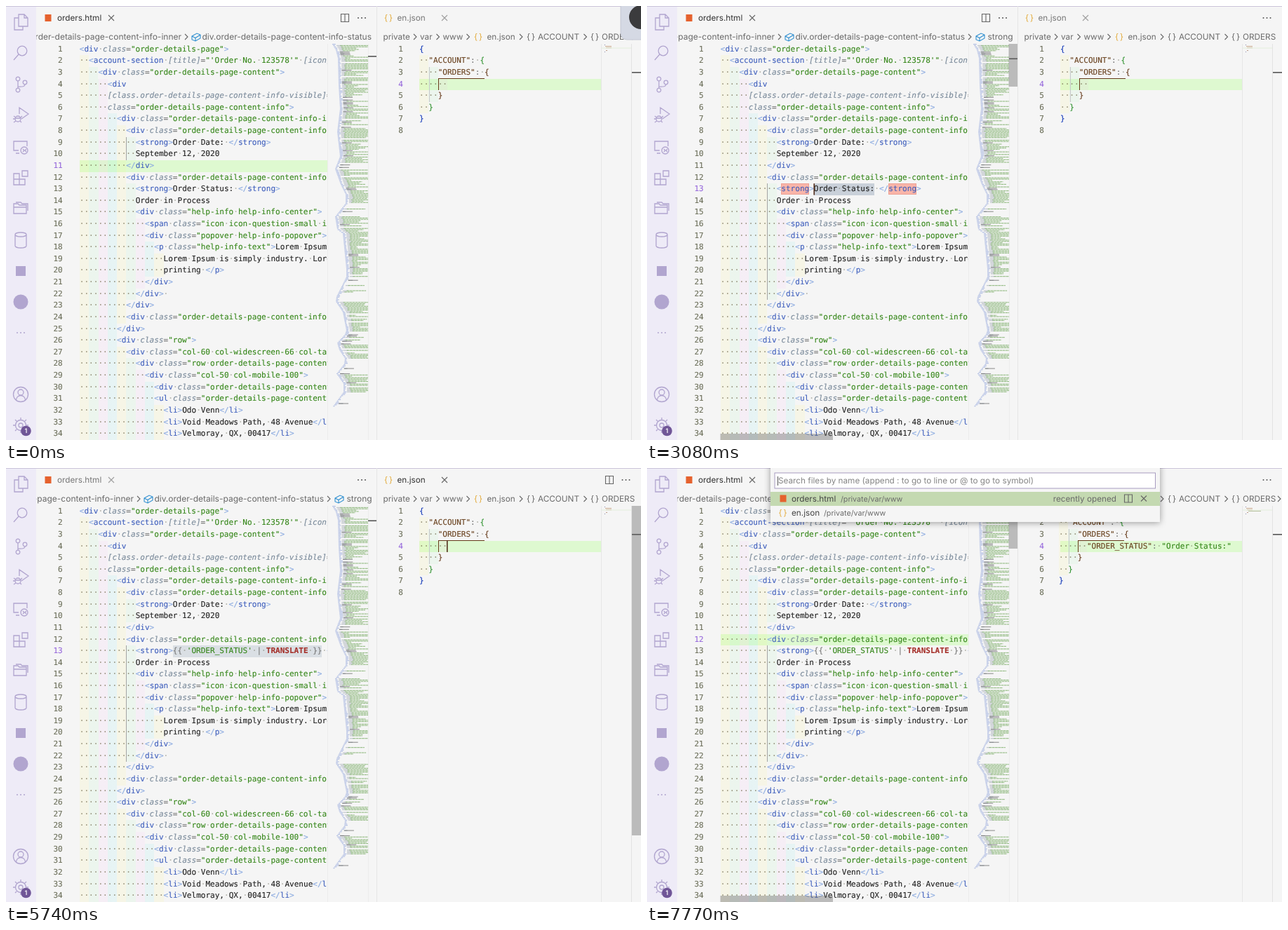
Animation of 905x619 px, one loop 8000 ms. Source, as an HTML page with a canvas:

```html
<!DOCTYPE html>
<html lang="en">
<head>
<meta charset="utf-8">
<title>Editor</title>
<style>
html, body { margin: 0; width: 100%; height: 100%; overflow: hidden; background: #f5f5f5; }
body { position: relative; text-rendering: geometricPrecision; }
#stage { position: absolute; left: 0; top: 0; width: 905px; height: 619px; overflow: hidden; }
#stage div, svg, canvas { position: absolute; }
.pane { top: 0; height: 619px; overflow: hidden; font: 11.04px/16.62px "DejaVu Sans Mono", monospace; color: #222; }
#html { left: 0; width: 458px; }
#json { left: 529px; width: 319px; }
.row { white-space: pre; height: 16.62px; -webkit-text-stroke: .12px; }
.num { width: 80.7px; text-align: right; color: #6d705b; }
#json .num { width: 36.8px; }
.num.on { color: #9769dc; }
.row b { font-weight: normal; }
.row i { font-style: normal; color: rgba(100, 100, 80, .45); }
.row .lead i { color: rgba(100, 90, 60, .62); }
.lead { background: repeating-linear-gradient(90deg,
  rgba(255, 245, 100, .1) 0 13.29px, rgba(127, 245, 150, .08) 13.29px 26.58px,
  rgba(255, 127, 255, .06) 26.58px 39.87px, rgba(79, 230, 236, .085) 39.87px 53.16px);
  display: inline-block; height: 16.62px; vertical-align: top; }
.row .p { color: #8aaae0; } .row .n { color: #3f5fbd; } .row .s { color: #36871a; }
.row .a { color: #7a8a9a; font-style: italic; } .row .e { color: #777; }
.row .f { color: #a5302a; font-weight: bold; } .row .k { color: #6a4320; }
.row .b1 { color: #1238b8; } .row .b2 { color: #319331; } .row .b3 { color: #663a1a; }
.hl { background: #def9d0; height: 16.62px; }
.sel { background: #c9d0d9; height: 16.62px; }
.hit { background: #f9b5a9; box-shadow: inset 0 0 0 1px #eda093; height: 16px; }
.guide { background: #a4a4a4; width: 1px; }
.match { width: 6px; height: 14px; border: 1px solid #b4b4b4; background: rgba(0, 100, 0, .06); }
svg { left: 0; top: 0; font: 11.75px Inter, sans-serif; }
svg text { fill: #6a6a6a; white-space: pre; }
#crumb { font-size: 12px; }
.line { fill: none; stroke: #666; stroke-width: 1.1; }
.act { fill: none; stroke: #b1a5cf; stroke-width: 1.3; }
.thumb { fill: #646464; fill-opacity: .4; }
.tiny { font-size: 10.7px; }
</style>
</head>
<body>
<div id="stage">
  <div class="pane" id="html"></div>
  <div class="pane" id="json"></div>
  <canvas id="map" width="52" height="522" style="left:464px;top:54px"></canvas>
  <svg id="ui" width="905" height="619" viewBox="0 0 905 619"></svg>
</div>
<script>
const CH = 6.646, ROW = 16.62, LOOP = 8000;
const $ = id => document.getElementById(id);
const rowTop = n => 53.7 + (n - 1) * ROW;
const col = n => 104.8 + n * CH;

// ---- code ----
const esc = s => s.replace(/[<>& ]/g, c => ({ '<': '&lt;', '>': '&gt;', '&': '&amp;', ' ': '<i>·</i>' })[c]);
const tok = (c, s) => `<b class="${c}">${esc(s)}</b>`;
const lead = n => `<span class="lead">${esc(' '.repeat(n))}</span>`;

const inTag = s => s.replace(/(<\/?)([\w-]+)|(\/?>)|("[^"]*"?)|([^\s="<>]+)|(\s+)|=/g,
  (m, open, name, close, str, attr, gap) =>
    open ? tok('p', open) + tok('n', name) : close ? tok('p', close) :
    str ? tok('s', str) : attr ? tok('a', attr) : gap ? esc(gap) : tok('e', m));

const paint = s => s[0] === '~' ? inTag(s.slice(1)) :
  s.match(/<[^>]*>?|[^<]+/g).map(p => p[0] === '<' ? inTag(p) : esc(p)).join('');

const info = 'order-details-page-content';
const source = `0<div class="order-details-page">
1<account-section [title]="'Order No. 123578'" [icon]="'orders'">
2<div class="${info}">
3<div
3~[class.${info}-info-visible]="visible"
3~class="${info}-info">
4<div class="${info}-info-inner">
5<div class="${info}-info-date">
6<strong>Order Date: </strong>
6September 12, 2020
5</div>
5<div class="${info}-info-status">
6<strong>Order Status: </strong>
6Order in Process
6<div class="help-info help-info-center">
7<span class="icon icon-question-small icon-help"></span>
7<div class="popover help-info-popover">
8<p class="help-info-text">Lorem Ipsum is simply
9Lorem Ipsum is simply industry. Lorem Ipsum
9printing </p>
7</div>
6</div> 
5</div>
5<div class="${info}-info-total">
4</div>
4<div class="row">
5<div class="col-60 col-widescreen-66 col-tablet-100">
6<div class="row ${info}-row">
7<div class="col-50 col-mobile-100">
8<div class="${info}-title">
8<ul class="${info}-list">
9<li>Odo Venn</li>
9<li>Void Meadows Path, 48 Avenue</li>
9<li>Velmoray, QX, 00417</li>`.split('\n');

function add(parent, cls, x, y, w, h) {
  const d = document.createElement('div');
  d.className = cls;
  d.style.cssText = `left:${x}px;top:${y}px` + (w ? `;width:${w}px` : '') + (h ? `;height:${h}px` : '');
  return parent.appendChild(d);
}
const show = (el, on) => { el.style.display = on ? '' : 'none'; };

const left = $('html'), right = $('json');
const leftHl = add(left, 'hl', 104.8, 0, 354);
const sel = add(left, 'sel', 0, rowTop(13));
const hits = [13, 36].map(c => add(left, 'hit', col(c), rowTop(13), 6 * CH));
const leftNums = [], leftRows = [];
source.forEach((s, i) => {
  const y = rowTop(i + 1);
  const num = add(left, 'row num', 0, y);
  num.textContent = i + 1;
  leftNums.push(num);
  const row = add(left, 'row', 104.8, y);
  row.innerHTML = lead(s[0] * 2) + paint(s.slice(1));
  leftRows.push(row);
});
const status = [leftRows[12].innerHTML,
  lead(12) + paint('<strong>') + tok('e', '{{ ') + tok('s', "'ORDER_STATUS'") + tok('e', ' | ') +
  tok('f', 'TRANSLATE') + tok('e', ' }}') + esc(' ') + paint('</strong>')];
const guide = add(left, 'guide', 0, 0);

add(right, 'hl', 60, rowTop(4), 260);
const json = add(right, '', 60, 0, 400, 619);
const entry = [lead(6), lead(6) + tok('k', '"ORDER_STATUS"') + tok('e', ':') + esc(' ') + tok('s', '"Order Status:"')];
const jsonRows = [tok('b1', '{'),
  lead(2) + tok('k', '"ACCOUNT"') + tok('e', ':') + esc(' ') + tok('b2', '{'),
  lead(4) + tok('k', '"ORDERS"') + tok('e', ':') + esc(' ') + tok('b3', '{'),
  entry[0], lead(4) + tok('b3', '}'), lead(2) + tok('b2', '}'), tok('b1', '}'), ''
].map((h, i) => {
  const num = add(right, 'row num' + (i === 3 ? ' on' : ''), 0, rowTop(i + 1));
  num.textContent = i + 1;
  const row = add(json, 'row', 0, rowTop(i + 1));
  row.innerHTML = h;
  return row;
});
add(json, 'guide', 14, rowTop(3), 0, 3 * ROW).style.background = '#c8c8c8';
add(json, 'guide', 27.3, rowTop(4), 0, ROW).style.background = '#663a1a';
add(json, 'guide', 27.3, rowTop(4) - .7, 66, 1).style.background = '#663a1a';
const matches = [[14, 3], [4, 5]].map(([c, r]) => add(json, 'match', c * CH - .7, rowTop(r)));

// ---- minimap ----
(function () {
  const g = $('map').getContext('2d');
  const edge = [[0, 1], [8, 6], [20, 9], [58, 10], [92, 12], [125, 8], [160, 12], [178, 5], [200, 13],
    [214, 20], [227, 20], [246, 5], [264, 8], [270, 16], [320, 21], [332, 21], [360, 7], [367, 6],
    [382, 16], [408, 21], [414, 19], [426, 8], [436, 11], [448, 19], [456, 18], [470, 7], [484, 17],
    [496, 17], [518, 1]];
  let seed = 7;
  const rnd = () => (seed = seed * 16807 % 2147483647) / 2147483647;
  const dash = (c, x, y, w) => { g.fillStyle = c; g.fillRect(x, y, w, 1.1); };
  for (let y = 0, k = 0; y < 518; y += 1.85) {
    while (edge[k + 1][0] < y) k++;
    const [y0, x0] = edge[k], [y1, x1] = edge[k + 1];
    const x = x0 + (x1 - x0) * (y - y0) / (y1 - y0), r = rnd();
    dash('rgba(90,120,205,.45)', x, y, 2 + rnd() * 3);
    if ((x1 < x0 && y > 170 && r < .75) || r < .08) continue;
    const w = 5 + rnd() * 3, end = r < .55 ? 52 : x + 16 + rnd() * 24;
    dash('rgba(110,125,140,.42)', x + 5, y, w - 1);
    if (r > .86) dash('rgba(50,50,50,.5)', x + 5, y, 14);
    else for (let q = x + w + 3; q < end; q += 4.2) dash('rgba(68,140,39,.55)', q, y, Math.min(3.7, end - q));
  }
})();

// ---- interface ----
const text = (x, y, s, extra = '') => `<text x="${x}" y="${y + 4.2}" ${extra}>${s}</text>`;
const path = (x, y, d, cls = 'line') => `<path class="${cls}" transform="translate(${x} ${y})" d="${d}"/>`;
const disc = (x, y, r, fill) => `<circle cx="${x}" cy="${y}" r="${r}" fill="${fill}"/>`;
const rect = (x, y, w, h, attr) => `<rect x="${x}" y="${y}" width="${w}" height="${h}" ${attr}/>`;
const group = (id, inner) => `<g id="${id}">${inner}</g>`;
const ring = (x, y, r) => `M${x - r} ${y}a${r} ${r} 0 1 0 ${2 * r} 0a${r} ${r} 0 1 0 ${-2 * r} 0`;
const chevron = x => path(x, 44, 'M-2 -4l4 4l-4 4');
const cross = (x, y) => path(x, y, 'M-4 -4l8 8M4 -4l-8 8');
const split = (x, y) => path(x, y, 'M-5.5 -5.5h11v11h-11zM0 -5.5v11');
const more = (x, y, fill = '#555') => [-5, 0, 5].map(d => disc(x + d, y, 1, fill)).join('');
const cube = x => path(x, 44, 'M-6 -1l7 -4l5 2v5l-7 4l-5 -2zM-6 -1l5 2.5l7 -4.5M-1 1.5v4.5').replace('class', 'style="stroke:#2f8fd0" class');
const braces = (x, y, c) => text(x, y, '{}', `text-anchor="middle" style="fill:${c};letter-spacing:2px"`);
const htmlMark = (x, y) => rect(x - 4.5, y - 5, 9, 10, 'fill="#e5622e"');
const badge = y => disc(28.5, y, 7.3, '#705697') + text(28.5, y - .8, '1', 'text-anchor="middle" style="fill:#fff;font-size:9px;font-weight:600"');

const actions = [
  [23, 'M-3 -11h8l5 5v12h-13zM5 -11v5h5M-3 -6h-6v17h12v-5'],
  [67, ring(2, -3, 6.8) + 'M-3 2l-7 8'],
  [112, ring(-4, -8, 2.8) + ring(-4, 8, 2.8) + ring(6, -3, 2.8) + 'M-4 -5v10M6 0q0 4 -10 3'],
  [156, 'M-2 -2v-9l13 9l-10 7' + ring(-4, 5, 4) + 'M-10 1l3 2M-11 5h3M-10 10l3 -2M2 1l-2 2M1 10l-2 -2M-8 4h8'],
  [201, 'M-3 5h-7v-13h19v7M-7 9h5' + ring(5, 5, 5) + 'M3 3l2 2l-2 2M8 3l-2 2l2 2'],
  [245, 'M-10 -6h8v8h8v8h-16zM-2 2v8M-10 2h8M2 -10h8v8h-8z'],
  [289, 'M-10 7v-14h6l2 2h10v12zM-10 -2h18M-7 -9h7l2 2h8v10'],
  [334, 'M-8 -8a8 3 0 0 1 16 0a8 3 0 0 1 -16 0v16a8 3 0 0 0 16 0v-16'],
  [554, ring(0, 0, 10.5) + ring(0, -3, 4) + 'M-6.5 8a6.5 6.5 0 0 1 13 0'],
  [598, ring(0, 0, 3) + ring(0, 0, 7.5) + 'M0 -11v3M0 8v3M-11 0h3M8 0h3M-8 -8l2.4 2.4M6 6l2 2M8 -8l-2.4 2.4M-6 6l-2 2']
];

$('ui').innerHTML =
  group('crumb', text(250, 44, 'div.order-details-page-content-info-inner', 'text-anchor="end"') +
    chevron(257) + cube(271) + text(521, 44, 'div.order-details-page-content-info-status', 'text-anchor="end"') +
    group('strong', chevron(528) + cube(543) + text(553.5, 44, 'strong'))) +
  rect(0, 0, 43, 619, 'fill="#eeebf7"') +
  rect(0, 0, 905, 1, 'fill="#cbc4da"') +
  rect(458, 54, 1, 565, 'fill="#ececec"') + rect(528, 0, 1, 619, 'fill="#e6e6e6"') +
  rect(516, 54, 1, 565, 'fill="#ececec"') +
  rect(848, 54, 1, 565, 'fill="#e6e6e6"') + rect(891, 54, 1, 565, 'fill="#e2e2e2"') +
  actions.map(([y, d]) => path(21, y, d, 'act')).join('') +
  rect(14, 371, 14, 14, 'fill="#b1a5cf"') + disc(21, 422, 10.5, '#b1a5cf') + more(21, 466, '#b1a5cf') +
  badge(606) + group('dirty', badge(30)) +
  htmlMark(60, 17) + text(73, 17, 'orders.html', 'id="tabL"') + group('closeL', cross(150, 17)) +
  disc(150, 17, 4, '#333" id="dotL') + more(507, 17) +
  braces(546, 17, '#e3ac3f') + text(557.5, 17, 'en.json', 'id="tabR"') + group('closeR', cross(625, 17)) +
  disc(625, 17, 4, '#333" id="dotR') + more(883.5, 17) +
  group('split', split(483, 17)) +
  text(537.5, 44, 'private') + chevron(583) + text(590, 44, 'var') + chevron(615.5) + text(622.5, 44, 'www') +
  chevron(658.5) + braces(674, 44, '#e3ac3f') + text(685.5, 44, 'en.json') + chevron(734) +
  braces(749, 44, '#666') + text(758, 44, 'ACCOUNT') + chevron(825.5) + braces(840, 44, '#666') +
  text(849, 44, 'ORDERS') + group('tail', chevron(901)) +
  rect(853, 55, 1, 1, 'fill="#88a"') + rect(854, 57, 9, 1, 'fill="#c9a98c"') + rect(855, 59, 8, 1, 'fill="#c9a98c"') +
  group('mapEntry', rect(857, 61, 18, 1, 'fill="#b5bf9c"')) + rect(855, 63, 2, 1, 'fill="#b98"') + rect(853, 65, 1, 1, 'fill="#88a"') +
  rect(849, 59.5, 42, 1, 'fill="#e4efdc"') +
  rect(516, 0, 12, 1.6, 'fill="#555" id="mark"') + rect(892, 94, 13, 1.6, 'fill="#555"') +
  group('barsL', rect(515.5, 54, 12.5, 61, 'class="thumb"') + rect(104.5, 610, 160.5, 9, 'class="thumb"')) +
  group('barsR', rect(892, 54, 13, 470, 'class="thumb"') + group('barH', rect(591, 610, 252, 9, 'class="thumb"'))) +
  rect(0, 0, 1.6, 16.4, 'fill="#54301f" id="caret"') +
  group('toast', rect(876, -14, 60, 62, 'rx="9" fill="#d5d9e4" stroke="#c2c6d2"') + disc(905, 16, 17, '#3b3b3d')) +
  group('popup', rect(176, -6, 555, 83, 'fill="#f5f5f5" style="filter:drop-shadow(0 1px 5px rgba(0,0,0,.38))"') +
    rect(182, 7, 542.5, 22, 'fill="#fff" stroke="#a79cc0"') + rect(186, 12, 1, 13, 'fill="#555"') +
    text(187, 18, 'Search files by name (append : to go to line or @ to go to symbol)', 'style="fill:#858585"') +
    rect(176, 34, 555, 20, 'fill="#c4d9b1"') + htmlMark(194, 43.5) + text(206, 44, 'orders.html', 'style="fill:#444"') +
    text(276, 44, '/private/var/www', 'class="tiny"') + text(669, 44, 'recently opened', 'text-anchor="end"') +
    split(686, 43.5) + cross(708, 43.5) +
    braces(194.5, 64, '#e3ac3f') + text(206, 64, 'en.json', 'style="fill:#444"') + text(252, 64, '/private/var/www', 'class="tiny"'));

// ---- timeline ----
const at = (steps, t) => { let v; for (const [s, x] of steps) if (t >= s) v = x; return v; };
const ramp = (t, start, len) => Math.min(1, Math.max(0, (t - start) / len));
const within = (t, a, b) => t >= a && t < b;

const active = [[0, 11], [700, 17], [2100, 13], [7070, 12]];
const blocks = { 11: [10, 9, 10], 17: [14, 18, 20], 13: [10, 13, 22], 12: [10, 13, 22] };
const selFrom = [[2450, 29], [2520, 26], [2590, 22], [2660, 20]];
const carets = [[0, null], [770, [310.6, 17]], [1260, null], [1750, [310.6, 17]], [2100, [323.4, 13]],
  [2450, 'drag'], [3290, null], [3570, 'drag'], [4480, null], [5740, [628, 4]], [5880, [833, 4]], [6600, null]];
const last = {};
function swap(el, html, key) {
  if (last[key] !== html) el.innerHTML = last[key] = html;
}

function draw(t) {
  const line = at(active, t), replaced = t >= 3990, pasted = t >= 5880;
  const selecting = within(t, 2450, 7070), rightFocus = within(t, 5250, 6930);
  const savedL = !within(t, 3990, 5250), savedR = !within(t, 5880, 6510);

  show(leftHl, !selecting);
  leftHl.style.top = rowTop(line) + 'px';
  leftNums.forEach((n, i) => n.classList.toggle('on', i + 1 === line));
  const [c, a, b] = blocks[line];
  guide.style.left = col(c) + 'px';
  guide.style.top = rowTop(a) + 'px';
  guide.style.height = (b - a + 1) * ROW + 'px';
  $('mark').setAttribute('y', 53.2 + (line - .5) * 1.7);

  swap(leftRows[12], status[+replaced], 'left');
  const from = at(selFrom, t) || 20;
  show(sel, selecting);
  sel.style.left = col(from) + 'px';
  sel.style.width = ((replaced ? 52 : 33) - from) * CH + 'px';
  sel.style.opacity = rightFocus ? .6 : 1;
  hits.forEach(h => show(h, within(t, 2870, 3990)));

  swap(jsonRows[3], entry[+pasted], 'right');
  json.style.left = (pasted ? 58 : 60) + 'px';
  matches.forEach(m => show(m, within(t, 5880, 6930)));
  show($('tail'), pasted);
  show($('mapEntry'), pasted);

  const inStrong = within(t, 2240, 7140);
  $('crumb').setAttribute('transform', `translate(${inStrong ? -68 : 0} 0)`);
  show($('strong'), inStrong);

  $('tabL').style.fill = rightFocus ? '#777' : '#333';
  $('tabR').style.fill = rightFocus ? '#333' : '#777';
  $('closeL').style.opacity = rightFocus ? .6 : 1;
  $('closeR').style.opacity = rightFocus ? 1 : .6;
  show($('closeL'), savedL);
  show($('dotL'), !savedL);
  show($('closeR'), savedR);
  show($('dotR'), !savedR);
  show($('dirty'), !savedL || !savedR);
  $('split').setAttribute('transform', `translate(${rightFocus ? 377 : 0} 0)`);

  $('barsL').style.opacity = ramp(t, 630, 100) - ramp(t, 4620, 800) + ramp(t, 6230, 100);
  $('barsR').style.opacity = ramp(t, 4620, 100) - ramp(t, 6230, 800);
  show($('barH'), pasted);

  let spot = at(carets, t);
  if (spot === 'drag') spot = [col(from) - .3, 13];
  show($('caret'), spot);
  if (spot) {
    $('caret').setAttribute('x', spot[0]);
    $('caret').setAttribute('y', rowTop(spot[1]));
  }

  show($('toast'), t < 350);
  $('toast').setAttribute('transform', `translate(${t >= 280 ? 14 : 0} 0)`);
  show($('popup'), t >= 7560);
}

const begin = performance.now();
function tick() {
  draw((performance.now() - begin) % LOOP);
  requestAnimationFrame(tick);
}
tick();
</script>
</body>
</html>
```
